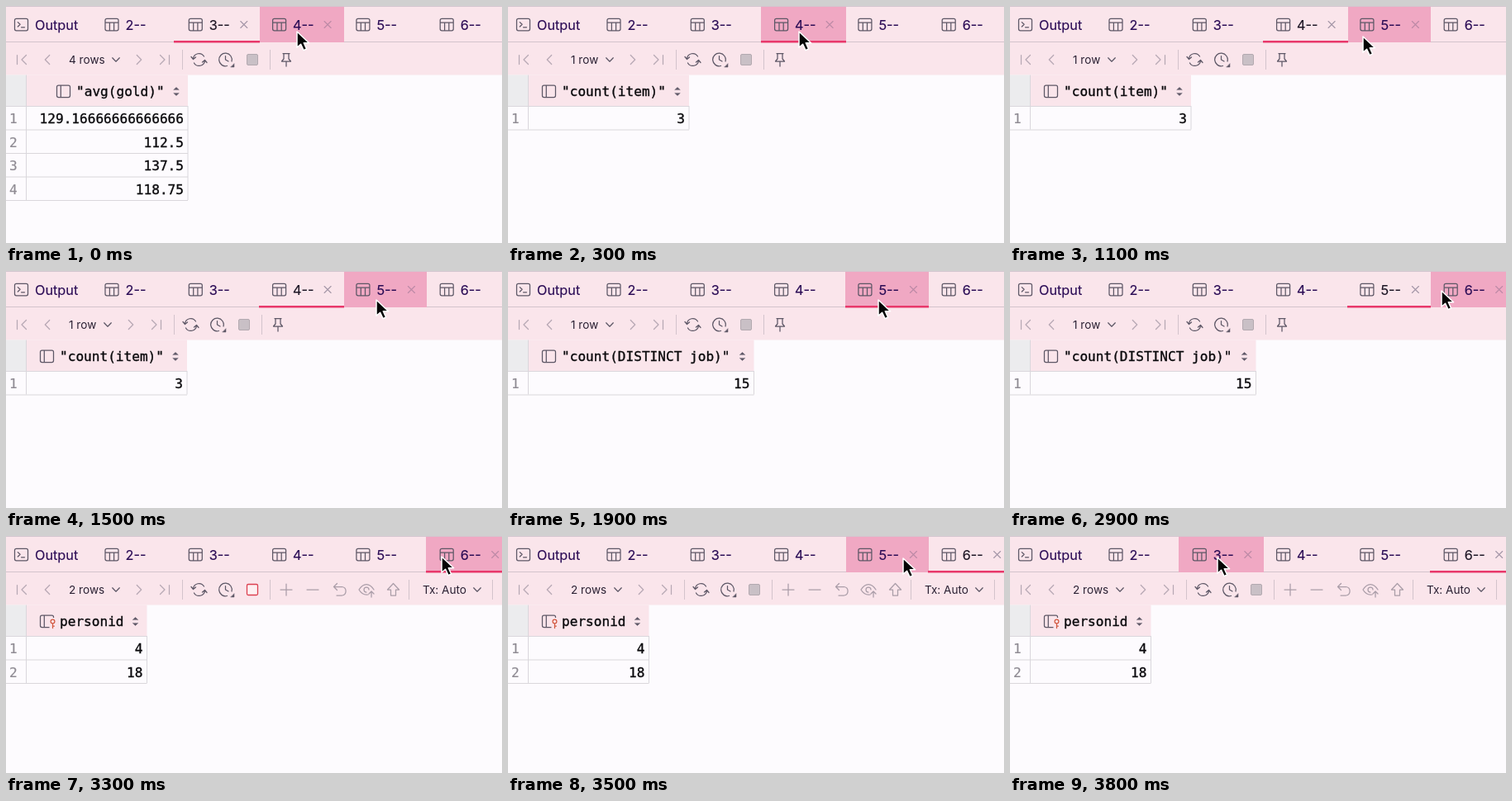
An HTML page for the animation above (3900 ms loop, 600x287 px).

```html
<!DOCTYPE html>
<html lang="en">
<head>
<meta charset="utf-8">
<title>Result tabs</title>
<style>
  html, body { margin: 0; width: 100%; height: 100%; overflow: hidden; background: #fdfbfe; }
  svg { display: block; width: 100%; height: 100%; }
  text { font-family: Inter, "Liberation Sans", sans-serif; white-space: pre; }
  .tab { font-size: 16.25px; fill: #2a0b55; stroke: #2a0b55; stroke-width: .15; }
  .tab.current { fill: #1c1524; stroke: #1c1524; }
  .bar { font-size: 13.6px; fill: #2a2033; }
  .mono { font-family: "DejaVu Sans Mono", "Noto Sans Mono", monospace; font-size: 16.1px;
    fill: #0b0a0d; stroke: #0b0a0d; stroke-width: .35; }
  .mono.num { fill: #8f8b93; stroke: #8f8b93; stroke-width: .2; }
  path { fill: none; stroke-width: 1.25; stroke-linecap: round; stroke-linejoin: round; }
</style>
</head>
<body>
<svg id="stage" viewBox="0 0 600 287" preserveAspectRatio="none"></svg>
<script>
const LOOP = 3900, STEP = 100;
const PINK = '#fae5eb', HOT = '#f0a8c3', ACCENT = '#e8386b';
const INK = '#5d5766', DIM = '#b7a8b4', GRID = '#dad7dc', RULE = '#d3c3cc';
const TAB_EDGES = [204, 307, 409, 509, 611];

const results = {
  3: { title: '"avg(gold)"', icon: 61, right: 220, rows: ['129.16666666666666', '112.5', '137.5', '118.75'] },
  4: { title: '"count(item)"', icon: 41, right: 219, rows: ['3'] },
  5: { title: '"count(DISTINCT job)"', icon: 41, right: 297.5, rows: ['15'] },
  6: { title: 'personid', icon: 41, right: 170.5, rows: ['4', '18'], editable: true }
};

// [time, selected tab]
const clicks = [[0, 3], [100, 4], [1600, 5], [3300, 6]];

// [time, x, y] of the pointer tip
const pointer = [
  [0, 352, 31], [800, 352, 31], [900, 367, 33], [1000, 400, 36], [1100, 427, 37],
  [1300, 445, 36], [1500, 448, 35], [2000, 448, 35], [2200, 457, 33], [2400, 487, 26],
  [2600, 504, 23], [2800, 518, 23], [3000, 526, 25], [3300, 527, 25], [3400, 520, 26],
  [3500, 478, 27], [3600, 385, 28], [3700, 290, 27], [3800, 251, 26]
];

function pointerAt(t) {
  const i = pointer.findIndex(p => p[0] > t);
  if (i < 0) return pointer[pointer.length - 1].slice(1);
  const [a, b] = [pointer[i - 1], pointer[i]];
  const k = (t - a[0]) / (b[0] - a[0]);
  return [1, 2].map(n => a[n] + (b[n] - a[n]) * k);
}

const rect = (x, y, w, h, fill, extra = '') =>
  `<rect x="${x}" y="${y}" width="${w}" height="${h}" fill="${fill}" ${extra}/>`;
const text = (x, y, s, cls, extra = '') =>
  `<text x="${x}" y="${y}" class="${cls}" ${extra}>${s}</text>`;
const icon = (x, y, d, color = INK, extra = '') =>
  `<path transform="translate(${x} ${y})" d="${d}" stroke="${color}" ${extra}/>`;
const divider = x => rect(x, 53, 1, 24, RULE);

const FRAME = 'M2 0H14Q16 0 16 2V12.5Q16 14.5 14 14.5H2Q0 14.5 0 12.5V2Q0 0 2 0Z';
const CROSS = 'M-4 -4L4 4M4 -4L-4 4';
const DOWN = 'M-4.3 -2.2L0 2.2L4.3 -2.2';

function drawTabs(selected, hover, [px, py]) {
  let out = rect(0, 0, 600, 83.5, PINK) + rect(0, 0, 600, 1, '#d3c6cf') + rect(0, 43, 600, 1, RULE);
  out += icon(10.5, 15.3, FRAME + 'M3.8 4.3L6.6 7L3.8 9.7M8 10.5H12') + text(35, 28.5, 'Output', 'tab');
  for (let n = 2; n <= 6; n++) {
    const x = 120 + (n - 2) * 101.3, right = TAB_EDGES[n - 2];
    const isSelected = n === selected, isHover = n === hover;
    const left = TAB_EDGES[n - 3] - (isSelected ? 1 : 0);
    if (isHover) out += rect(left, 1, right - left, 43, HOT);
    if (isSelected) out += rect(left, 42, right - left, 2.5, ACCENT);
    out += icon(x, 15.3, FRAME + 'M0 4.8H16M5.4 4.8V14.5M10.6 4.8V14.5');
    out += text(x + 24.5, 28.5, n + '--', isSelected && !isHover ? 'tab current' : 'tab');
    if (isSelected || isHover) {
      const cx = x + 66.5;
      const onClose = isHover && px > cx - 9 && px < cx + 17 && py < 31;
      if (onClose) out += `<circle cx="${cx}" cy="22.5" r="9.5" fill="#cf8dac"/>`;
      out += icon(cx, 22.5, CROSS, onClose ? '#795d70' : isHover ? '#bd8aa6' : '#a597a8',
        'style="stroke-width:1.15"');
    }
  }
  return out;
}

function drawToolbar(result, busy) {
  const count = result.rows.length, shift = count > 1 ? 0 : -10;
  const at = (x, d, color, extra) => icon(x + shift, 65, d, color, extra);
  let out = icon(19, 65, 'M-5.5 -5.5V5.5M5.5 -5.5L0 0L5.5 5.5', DIM);
  out += icon(50, 65, 'M2.7 -5.5L-2.7 0L2.7 5.5', DIM);
  out += text(76, 69.7, `${count} row${count > 1 ? 's' : ''}`, 'bar');
  out += at(133, DOWN);
  out += at(161, 'M-2.7 -5.5L2.7 0L-2.7 5.5', DIM);
  out += at(192, 'M5.5 -5.5V5.5M-5.5 -5.5L0 0L-5.5 5.5', DIM);
  out += divider(213 + shift);
  out += at(233.5, 'M-7 -1A7 7 0 0 1 6 -4M7 1A7 7 0 0 1 -6 4M-9.5 -3.5L-7 -.5L-4 -3M9.5 3.5L7 .5L4 3');
  out += at(265.5, 'M7.5 2A7.8 7.8 0 1 0 2 7.5M0 -4.5V0L3.5 2');
  out += at(275, 'M1 5V9H-3Z', INK, `style="fill:${INK};stroke-width:.5"`);
  out += busy
    ? rect(291.5, 58.5, 13, 13, '#fdf0f2', 'rx="1.5" stroke="#dc4050" stroke-width="1.3"')
    : rect(291.5 + shift, 58.5, 13, 13, '#c9c0c6', 'rx="1.5" stroke="#b3a9b0"');
  out += divider(319 + shift);
  if (!result.editable)
    return out + at(339, 'M-4 -7.5H4M-3 -7.5V-1L-5.5 2H5.5L3 -1V-7.5M0 2V8');

  const GRAY = '#aa9da8';
  out += icon(339, 65, 'M-7 0H7M0 -7V7', GRAY) + icon(371, 65, 'M-7 0H7', GRAY);
  out += icon(404, 65, 'M-3.5 -7.5L-7.5 -3.5L-3.5 .5M-7.5 -3.5H2.5A5.3 5.3 0 0 1 2.5 7H-4', GRAY);
  out += icon(436, 65, 'M2 6Q-5 7 -9 0Q-5 -6.5 0 -6.5T9 0M3 0A3 3 0 1 0 0 3M6 9V2M3 5L6 2L9 5', GRAY);
  out += icon(468.5, 65, 'M0 -7.5L-7 0H-3V7H3V0H7Z', GRAY);
  out += divider(487) + text(504, 69.7, 'Tx: Auto', 'bar') + icon(570, 65, DOWN) + divider(588);
  return out;
}

function drawTable({ title, icon: x, right, rows, editable }) {
  const top = 121, pitch = 28.5, bottom = top + rows.length * pitch;
  let out = rect(0, 83.5, 24, 37.5, '#ececee') + rect(25, 83.5, right - 25, 37.5, PINK);
  out += icon(x + .5, 96, FRAME + 'M4.8 0V14.5');
  if (editable) {
    out += rect(x + 11.5, 99, 10, 13, PINK);
    out += icon(x + 15.5, 103.5, 'M2.4 0A2.4 2.4 0 1 0 -2.4 0A2.4 2.4 0 1 0 2.4 0M0 2.4V8M0 5.7H1.8', '#d2583f');
  }
  out += text(x + 24, 109.2, title, 'mono');
  out += icon(right - 14, 103.5, 'M-3 -2.2L0 -5L3 -2.2ZM-3 2.2L0 5L3 2.2Z', INK, `style="fill:${INK};stroke-width:.5"`);
  out += rect(24, 83.5, 1, bottom - 83.5, GRID) + rect(right - .5, top, 1, bottom - top, GRID);
  for (let i = 0; i <= rows.length; i++)
    out += rect(0, top + i * pitch, right, 1, GRID);
  rows.forEach((value, i) => {
    const y = 142 + i * pitch;
    out += text(4, y, i + 1, 'mono num') + text(right - 5, y, value, 'mono', 'text-anchor="end"');
  });
  return out;
}

const drawPointer = ([x, y]) =>
  icon(x, y, 'M0 0V19.2L4.6 15.2L8 22.6L11.6 21L8.3 13.8H14.6Z', '#fff', 'style="fill:#050505;stroke-width:1.5"');

const stage = document.getElementById('stage');
let shown = -1;

function render(now) {
  const t = Math.floor(now % LOOP / STEP) * STEP;
  if (t !== shown) {
    shown = t;
    const tip = pointerAt(t);
    const selected = clicks.filter(c => c[0] <= t).pop()[1];
    const hover = 2 + TAB_EDGES.filter(edge => edge <= tip[0]).length;
    const busy = t >= 3300 && t < 3500;
    stage.innerHTML = rect(0, 0, 600, 287, '#fdfbfe') + drawTabs(selected, hover, tip) +
      drawToolbar(results[selected], busy) + drawTable(results[selected]) + drawPointer(tip);
  }
}

const start = performance.now();
function tick() {
  render(performance.now() - start);
  requestAnimationFrame(tick);
}
tick();
</script>
</body>
</html>
```
